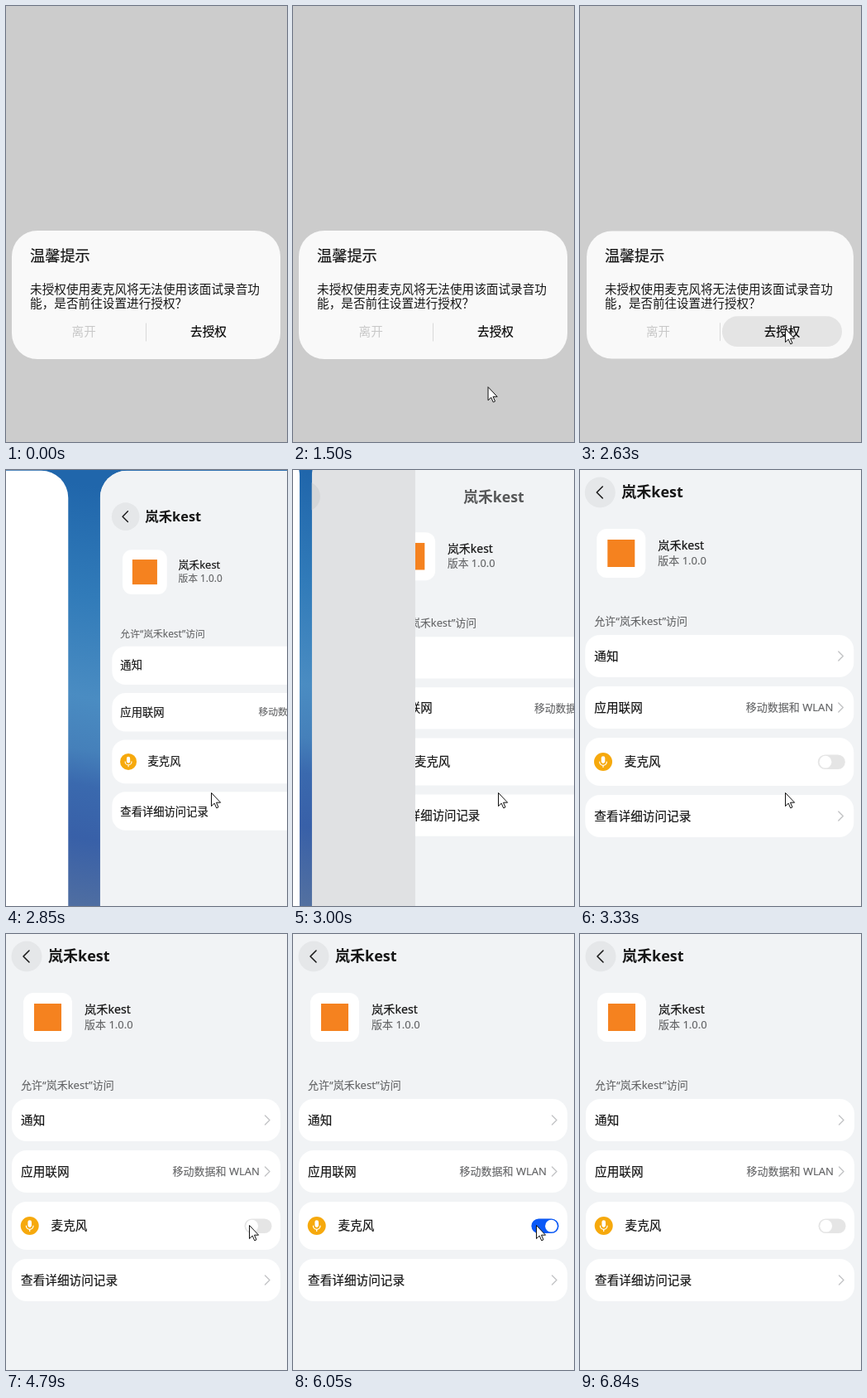
An HTML page for the animation above (9500 ms loop, 340 by 526 pixels).

```html
<!DOCTYPE html>
<html lang="zh-CN">
<head>
<meta charset="utf-8">
<title>授权流程</title>
<style>
  html, body { margin: 0; width: 100%; height: 100%; overflow: hidden; background: #ccc; }
  svg { display: block; }
  text { font: 14.63px "Noto Sans", "Noto Sans CJK SC", "Noto Sans CJK", sans-serif; fill: #161616; }
  .mid { stroke: #161616; stroke-width: .2px; }
  .small { font-size: 13px; fill: #636466; stroke: #636466; stroke-width: .12px; }
  .title { font-size: 18px; font-weight: 700; }
  .line { fill: none; stroke-linecap: round; stroke-linejoin: round; }
</style>
</head>
<body>
<svg width="340" height="526" viewBox="0 0 340 526">
  <defs>
    <linearGradient id="sky" x1="0" y1="0" x2="-.12" y2="1">
      <stop offset="0" stop-color="#2066ab"/>
      <stop offset=".25" stop-color="#317bb9"/>
      <stop offset=".48" stop-color="#4a8cc2"/>
      <stop offset=".6" stop-color="#4580ba"/>
      <stop offset=".68" stop-color="#3a69ae"/>
      <stop offset=".8" stop-color="#3860a8"/>
      <stop offset="1" stop-color="#56729f"/>
    </linearGradient>
    <clipPath id="cardClip"><rect x="-9" y="-34" width="358" height="770" rx="36"/></clipPath>
    <clipPath id="pageClip"><rect id="pageEdge" y="-34" width="400" height="770"/></clipPath>
    <g id="back">
      <circle cx="25" cy="27" r="18.5" fill="#e5e7e9"/>
      <path class="line" d="M28 20L21 27L28 34" stroke="#1b1b1b" stroke-width="1.6"/>
    </g>
    <path id="more" class="line" d="M0 -5.5L5.5 0L0 5.5" stroke="#c3c4c6" stroke-width="1.4"/>
  </defs>

  <rect width="340" height="526" fill="url(#sky)"/>

  <g id="oldCard">
    <rect x="-9" y="-34" width="358" height="770" rx="36" fill="#fff"/>
    <g id="modal">
      <rect id="dim" x="-9" y="-34" width="358" height="770" fill="#ccc"/>
      <g id="dialog">
        <rect x="7" y="271" width="325" height="155" rx="31" fill="#f9f9f9"/>
        <text class="mid" x="29" y="308" style="font-size:18.2px">温馨提示</text>
        <text x="29" y="347">未授权使用麦克风将无法使用该面试录音功</text>
        <text x="29" y="364">能，是否前往设置进行授权？</text>
        <rect id="pressed" x="172" y="374.5" width="146" height="37" rx="18.5" fill="#e4e4e4"/>
        <path d="M169.5 382.5V404.5" stroke="#dadada"/>
        <text x="79.5" y="398" style="fill:#c8c8c8">离开</text>
        <text class="mid" x="223" y="398" style="fill:#000">去授权</text>
      </g>
    </g>
  </g>

  <g id="newCard">
    <g clip-path="url(#cardClip)">
      <rect x="-9" y="-34" width="358" height="770" fill="#e0e1e3"/>
      <circle id="oldBack" cx="25" cy="27" r="18.5" fill="#d4d6d8"/>
      <g clip-path="url(#pageClip)">
        <rect x="-9" y="-34" width="400" height="770" fill="#f1f3f5"/>
        <use id="newBack" href="#back"/>
        <text id="heading" class="title" x="51" y="33">岚禾kest</text>
        <g id="content">
          <rect x="21" y="71" width="59" height="59" rx="12" fill="#fff"/>
          <rect x="34" y="84" width="33" height="33" fill="#f5821f"/>
          <text class="mid" x="95" y="96" style="font-size:14.2px">岚禾kest</text>
          <text class="small" x="95" y="114">版本 1.0.0</text>
          <text class="small" x="18" y="187">允许“岚禾kest”访问</text>
          <g fill="#fff">
            <rect x="7" y="199" width="325" height="51" rx="18"/>
            <rect x="7" y="261" width="325" height="51" rx="18"/>
            <rect x="7" y="323" width="325" height="58" rx="18"/>
            <rect x="7" y="392" width="325" height="51" rx="18"/>
          </g>
          <text class="mid" x="18" y="229.5">通知</text>
          <text class="mid" x="18" y="291.5">应用联网</text>
          <text class="mid" x="54.5" y="357">麦克风</text>
          <text class="mid" x="18" y="423">查看详细访问记录</text>
          <text class="small" x="307" y="291" text-anchor="end">移动数据和 WLAN</text>
          <use href="#more" x="313.5" y="224.5"/>
          <use href="#more" x="313.5" y="286.5"/>
          <use href="#more" x="313.5" y="417.5"/>
          <circle cx="28.7" cy="352" r="11" fill="#f6a90d"/>
          <rect x="26.4" y="345.3" width="4.6" height="8.6" rx="2.3" fill="#fff"/>
          <path class="line" d="M24.4 352a4.3 4.3 0 0 0 8.6 0M28.7 356.4V358.4" stroke="#fff" stroke-width="1.2"/>
          <rect x="288.5" y="343.5" width="33" height="17.5" rx="8.75" fill="#e5e5e5"/>
          <rect id="on" x="288.5" y="343.5" width="33" height="17.5" rx="8.75" fill="#0a59f7"/>
          <circle id="knob" cx="297.7" cy="352.2" r="7.4" fill="#fff"/>
        </g>
      </g>
    </g>
  </g>

  <path id="cursor" d="M.5 .5V16.6L4.2 13.1L6.7 18.8L9 17.8L6.5 12.2H11.6Z" fill="#fff" stroke="#111"/>
</svg>
<script>
const LOOP = 9500, OPEN = 2770, SLIDE = 2850, PUSH = 2900;
const $ = id => document.getElementById(id);
const set = (id, name, value) => $(id).setAttribute(name, value);
const move = (id, x, y = 0, s = 1) => set(id, 'transform', `translate(${x} ${y}) scale(${s})`);
const show = (id, yes) => set(id, 'visibility', yes ? 'visible' : 'hidden');
const part = (t, from, to) => Math.min(1, Math.max(0, (t - from) / (to - from)));
const smooth = p => p * p * (3 - 2 * p);

// Eased value at time t from [time, value] pairs
function key(t, keys) {
  let [, v] = keys[0];
  for (let i = 1; i < keys.length; i++) {
    v += (keys[i][1] - v) * smooth(part(t, keys[i - 1][0], keys[i][0]));
  }
  return v;
}

function drawDialog(t) {
  const down = t >= 2630, s = down ? .9935 : 1;
  move('dialog', 169.5 * (1 - s), 348.5 * (1 - s), s);
  show('pressed', down);
  set('dim', 'fill', down ? '#cecece' : '#ccc');
  set('modal', 'opacity', 1 - part(t, OPEN, 2835));
}

function drawCards(t) {
  const rise = part(t, OPEN, SLIDE), left = 1 - part(t, SLIDE, 3350);
  const s = 1 - .091 * rise * left ** 5.05;
  const edge = rise < 1 ? 349 - 234.3 * rise : 123.7 * left ** 3.78 - 9;
  const gap = 38.7 * rise * left ** 2.68;
  const nudge = key(t, [[3250, 0], [3320, -.7], [3500, -.7], [3560, 0]]);
  const y = 351 * (1 - s);
  move('oldCard', edge - gap - 349 * s, y, s);
  move('newCard', edge + 9 * s + nudge, y, s);
  show('newCard', t >= OPEN);
}

function drawPage(t) {
  const pushed = t >= PUSH;
  const x = pushed ? 340 * (1 - part(t, PUSH, 3330)) ** 3.95 : 0;
  set('pageEdge', 'x', x > .5 ? x : -9);
  move('content', x * .53);
  move('heading', x * 1.07, x * .01);
  set('heading', 'opacity', 1 - x / 390);
  move('oldBack', (x - 340) * .19);
  set('newBack', 'opacity', pushed ? part(t, 3050, 3200) : 1);
}

function drawToggle(t) {
  const on = key(t, [[5100, 0], [5400, 1], [6050, 1], [6280, 0]]);
  set('on', 'opacity', on);
  move('knob', on * 14.8);
}

function drawCursor(t) {
  const x = key(t, [[1400, 228], [1690, 255], [1920, 255], [2110, 248], [4350, 248], [4790, 294], [6560, 294], [6840, 304]]);
  const y = key(t, [[1400, 489], [1690, 382], [1920, 382], [2110, 389], [4350, 389], [4790, 351], [6560, 351], [6840, 478]]);
  move('cursor', x, y);
  show('cursor', t >= 1400 && t < 6840);
}

const start = performance.now();
function frame() {
  const t = (performance.now() - start) % LOOP;
  [drawDialog, drawCards, drawPage, drawToggle, drawCursor].forEach(draw => draw(t));
  requestAnimationFrame(frame);
}
frame();
</script>
</body>
</html>
```
